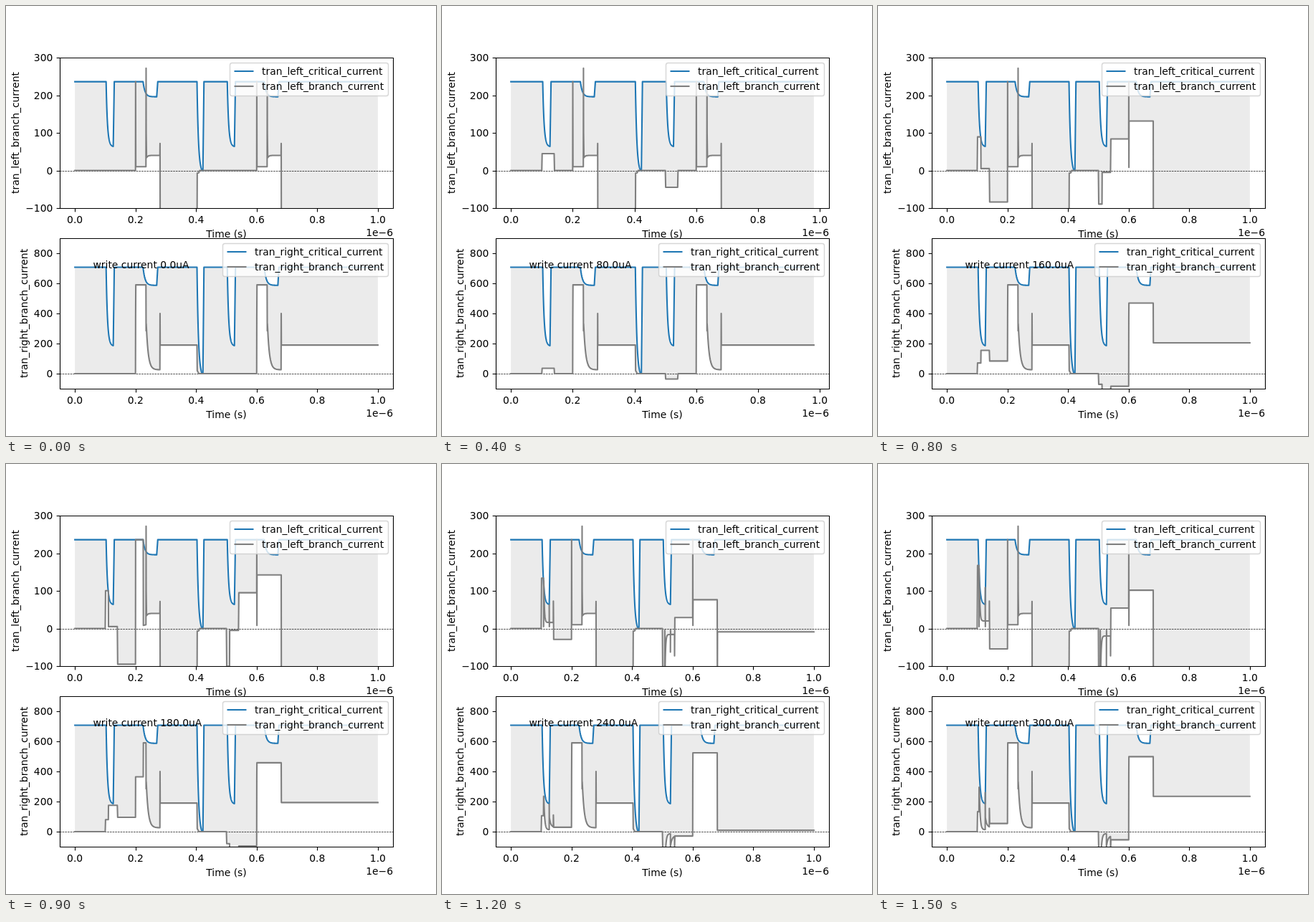
These frames come from a looping animation (600 px wide and 600 px high, 1.6 s). An HTML page with a canvas:

```html
<!DOCTYPE html>
<html>
<head>
<meta charset="utf-8">
<style>
html, body { margin: 0; overflow: hidden; background: #fff; }
canvas { display: block; }
</style>
</head>
<body>
<canvas id="stage" width="600" height="600"></canvas>
<script>
const ctx = document.getElementById('stage').getContext('2d');
const BLUE = '#1f77b4', GRAY = '#7f7f7f';
const LEFT = 75, WIDTH = 465, X0 = 96.14;
const panels = [
  { side: 'left', top: 72, zero: 229.5, unit: 0.525, ticks: [300, 200, 100, 0, -100],
    peak: 236, depth: 0.733, labelX: 18, legendX: 312.5 },
  { side: 'right', top: 324, zero: 513, unit: 0.21, ticks: [800, 600, 400, 200, 0],
    peak: 707, depth: 0.741, labelX: 30, legendX: 302.5 }
];

// Critical current: exponential dips, each followed by a quick recovery.
function criticalCurve({ peak, depth }, end) {
  const points = [[0, peak]];
  const dip = (t0, t1, amount, tau) => {
    for (let i = 0; i <= 40; i++) {
      const t = t0 + (t1 - t0) * i / 40;
      points.push([t, peak * Math.max(0, 1 - amount * (1 - Math.exp((t0 - t) / tau)))]);
    }
    points.push([t1 + 0.0035, peak]);
  };
  const writeAndRead = t => {
    dip(t + 0.103, t + 0.1265, depth, 0.0045);
    dip(t + 0.225, t + 0.27, 0.17, 0.0065);
  };
  writeAndRead(0);
  dip(0.403, 0.4225, 1.03, 0.0048);
  writeAndRead(0.4);
  points.push([end, peak]);
  return points;
}

// Currents of both branches for one write current.
function branchCurves(current, end) {
  const left = [], right = [];
  const add = (t, l, r) => { left.push([t, l]); right.push([t, r]); };
  const decay = (t0, t1, l0, l1, tauL, r0, r1, tauR) => {
    for (let i = 0; i <= 30; i++) {
      const dt = (t1 - t0) * i / 30;
      add(t0 + dt, l1 + (l0 - l1) * Math.exp(-dt / tauL), r1 + (r0 - r1) * Math.exp(-dt / tauR));
    }
  };
  const l = 0.558 * current, r = 0.442 * current;
  const stored = current <= 100 ? 0
    : current <= 180 ? l - 5.5
    : 29 + 0.42 * (current - 240);

  function write(t, s) {
    add(t, 0, 0);
    add(t + 0.0012, s * l, s * r);
    if (current > 100) {
      const flip = t + 0.0035 - 0.0045 * Math.log((l - 63) / 173);
      add(flip, s * l, s * r);
      if (current <= 180) {
        add(flip + 0.0005, s * 5, s * (current - 5));
        add(t + 0.04, s * 5, s * (current - 5));
      } else {
        const rest = s * current / 15, pulse = t + 0.0265;
        add(flip + 0.0005, s * 5, s * (current - 5));
        decay(flip + 0.001, pulse, s * l * 0.95, rest, 0.002, s * (current - 8), s * 13, 0.003);
        add(pulse, s * (0.77 * current - 122), s * (1.28 * current - 125));
        add(pulse + 0.0004, s * 5, s * 95);
        decay(pulse + 0.0008, t + 0.04, rest, rest, 0.004, s * 90, s * 27, 0.005);
        add(t + 0.0402, s * 73, s * (0.75 * current - 70));
      }
    } else add(t + 0.04, s * l, s * r);
    add(t + 0.0412, -s * stored, s * stored);
  }

  function switchingRead(t, late) {
    add(t + 0.0004, 236, 364);
    if (late) add(t + 0.0255, 236, 364);
    add(t + (late ? 0.026 : 0.001), late ? 8 : 10, 590);
    add(t + 0.0345, 10, 590);
    add(t + 0.035, 272, 285);
    add(t + 0.0353, 100, 333);
    decay(t + 0.0365, t + 0.0805, 34, 40, 0.004, 290, 26, 0.0065);
    add(t + 0.081, 72, 400);
    add(t + 0.0815, -190, 190);
  }

  add(0, 0, 0);
  write(0.1, 1);
  add(0.2, -stored, stored);
  switchingRead(0.2, current === 180);
  add(0.403, -190, 190);
  add(0.4038, -7, 20);
  add(0.409, -6, 0);
  add(0.412, 0, 0);
  write(0.5, -1);
  add(0.6, stored, -stored);
  if (stored) {
    const level = stored + 47.5, after = 336 - level;
    const final = after < 236 ? after : 9;
    add(0.6004, 236, 364);
    add(0.6008, 8, 600 - level);
    add(0.6012, level, 600 - level);
    add(0.681, level, 600 - level);
    add(0.6815, -Math.max(final, 190), final);
    add(0.682, -final, final);
    add(end, -final, final);
  } else {
    switchingRead(0.6, false);
    add(end, -190, 190);
  }
  return [left, right];
}

function text(string, x, y, align = 'left') {
  ctx.fillStyle = '#000';
  ctx.textAlign = align;
  ctx.fillText(string, x, y);
}

function line(points, color, width) {
  ctx.beginPath();
  points.forEach(p => ctx.lineTo(...p));
  ctx.strokeStyle = color;
  ctx.lineWidth = width;
  ctx.stroke();
}

function drawLegend({ side, top, legendX: x }) {
  ctx.beginPath();
  ctx.roundRect(x, top + 7.5, 533.5 - x, 46, 3);
  ctx.fillStyle = 'rgba(255,255,255,0.8)';
  ctx.fill();
  ctx.strokeStyle = 'rgba(204,204,204,0.8)';
  ctx.lineWidth = 1.39;
  ctx.stroke();
  [['critical', BLUE], ['branch', GRAY]].forEach(([kind, color], i) => {
    const y = top + 19 + 21 * i;
    line([[x + 6, y], [x + 33, y]], color, 2.08);
    text(`tran_${side}_${kind}_current`, x + 44.6, y + 5);
  });
}

function drawPanel(panel, branch, end) {
  const { side, top, zero, unit } = panel, bottom = top + 210;
  const scale = 422.73 / end;
  const toPixels = ([t, v]) => [X0 + t * scale, zero - v * unit];
  const critical = criticalCurve(panel, end).map(toPixels);
  const current = branch.map(toPixels);

  ctx.fillStyle = '#fff';
  ctx.fillRect(LEFT, top, WIDTH, 210);
  ctx.save();
  ctx.beginPath();
  ctx.rect(LEFT, top, WIDTH, 210);
  ctx.clip();
  ctx.beginPath();
  critical.concat([...current].reverse()).forEach(p => ctx.lineTo(...p));
  ctx.fillStyle = '#ebebeb';
  ctx.fill();
  const dashY = Math.floor(zero + 0.5) + 0.5;
  ctx.lineCap = 'butt';
  ctx.setLineDash([2.57, 1.11]);
  line([[LEFT, dashY], [LEFT + WIDTH, dashY]], '#000', 0.69);
  ctx.setLineDash([]);
  ctx.lineCap = 'square';
  line(critical, BLUE, 2.08);
  line(current, GRAY, 2.08);
  ctx.restore();

  ctx.lineCap = 'butt';
  ctx.strokeStyle = '#000';
  ctx.lineWidth = 1.11;
  ctx.strokeRect(LEFT + 0.5, top + 0.5, WIDTH, 210);
  for (let i = 0; i <= 5; i++) {
    const x = X0 + i / 5 * scale, snapped = Math.round(x) + 0.5;
    line([[snapped, bottom + 0.5], [snapped, bottom + 5.4]], '#000', 1.11);
    text((i / 5).toFixed(1), x, bottom + 21, 'center');
  }
  for (const value of panel.ticks) {
    const y = zero - value * unit, snapped = Math.floor(y + 0.5) + 0.5;
    line([[LEFT - 4.4, snapped], [LEFT + 0.5, snapped]], '#000', 1.11);
    text(String(value).replace('-', '−'), 65.3, Math.round(y + 5.1), 'right');
  }
  text('Time (s)', 307.5, bottom + 41, 'center');
  text('1e−6', 540, bottom + 39, 'right');
  ctx.save();
  ctx.translate(panel.labelX, top + 105);
  ctx.rotate(-Math.PI / 2);
  text(`tran_${side}_branch_current`, 0, 0, 'center');
  ctx.restore();
}

function draw(step) {
  const current = step * 20;
  const end = current === 80 ? 0.981 : 1;
  const branches = branchCurves(current, end);
  ctx.fillStyle = '#fff';
  ctx.fillRect(0, 0, 600, 600);
  ctx.font = '13.89px "DejaVu Sans", sans-serif';
  ctx.lineJoin = 'round';
  panels.forEach((panel, i) => {
    drawPanel(panel, branches[i], end);
    if (i) text(`write current ${current.toFixed(1)}uA`, 121.5, 366);
    drawLegend(panel);
  });
}

let shown = -1;
function tick() {
  const step = Math.floor(performance.now() / 100) % 16;
  if (step !== shown) draw(shown = step);
  requestAnimationFrame(tick);
}
tick();
</script>
</body>
</html>
```
